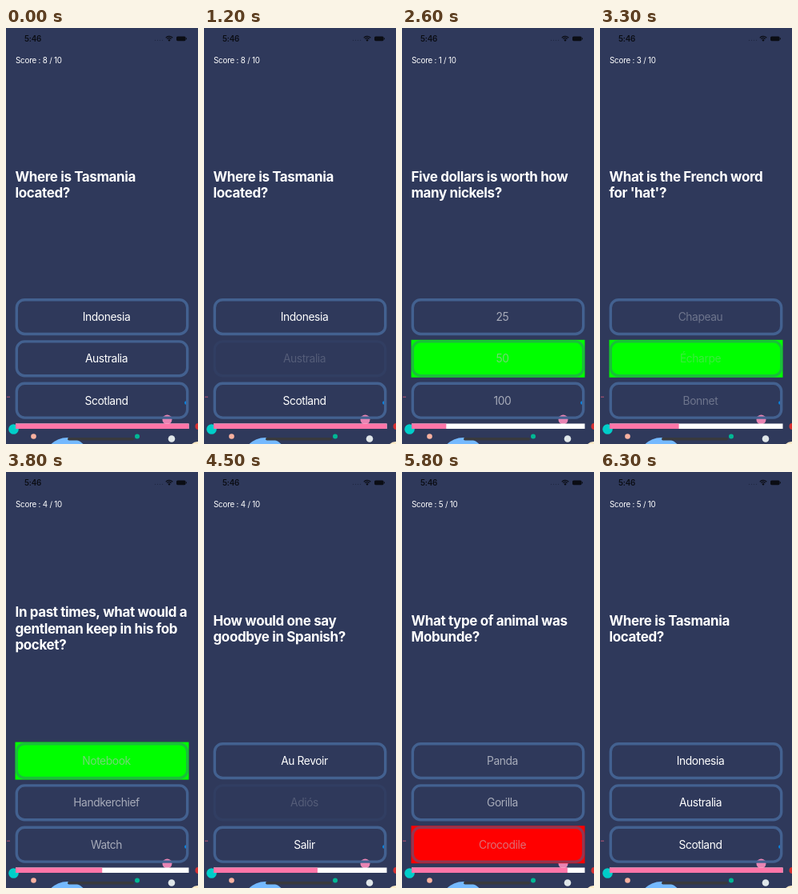
Recreate the animation shown at these times as an HTML page with a canvas. Size 240 by 520 pixels, loop 6.4 s.

```html
<!DOCTYPE html>
<html lang="en">
<head>
<meta charset="utf-8">
<title>Quiz</title>
<style>
html, body { margin: 0; width: 100%; height: 100%; overflow: hidden; background: #2f395b; }
canvas { display: block; width: 240px; height: 520px; }
</style>
</head>
<body>
<canvas id="stage"></canvas>
<script>
const W = 240, H = 520, LOOP = 6400, STEP = 100;
const BG = '#2f395b', EDGE = '#436190';
const GREEN = '#00ff00', RED = '#ff0000';
const SANS = 'Inter, "Liberation Sans", sans-serif';
const TOPS = [338, 390.2, 442.6];

const quiz = [
  { ask: ['Which is the largest organ', 'in the human body?'], answers: ['Heart', 'Skin', 'Large Intestine'], right: 1 },
  { ask: ['Five dollars is worth how', 'many nickels?'], answers: ['25', '50', '100'], right: 2 },
  { ask: ['What do the letters in the', 'GMT time zone stand for?'], answers: ['Global Meridian Time', 'Greenwich Mean Time', 'General Median Time'], right: 1 },
  { ask: ['What is the French word', "for 'hat'?"], answers: ['Chapeau', 'Écharpe', 'Bonnet'], right: 0 },
  { ask: ['In past times, what would a', 'gentleman keep in his fob', 'pocket?'], answers: ['Notebook', 'Handkerchief', 'Watch'], right: 2 },
  { ask: ['How would one say', 'goodbye in Spanish?'], answers: ['Au Revoir', 'Adiós', 'Salir'], right: 1 },
  { ask: ['Which of these colours is', 'NOT featured in the logo', 'for Lumbra?'], answers: ['Green', 'Orange', 'Blue'], right: 1 },
  { ask: ['What alcoholic drink is', 'made from molasses?'], answers: ['Rum', 'Whisky', 'Gin'], right: 0 },
  { ask: ['What type of animal was', 'Mobunde?'], answers: ['Panda', 'Gorilla', 'Crocodile'], right: 1 },
  { ask: ['Where is Tasmania', 'located?'], answers: ['Indonesia', 'Australia', 'Scotland'], right: 1 }
];

// Each turn: question, score shown, time of the tap, tapped answer.
// The next question follows 200 ms after the tap.
const turns = [
  [9, 8, 1200, 1], [0, 0, 2300, 1], [1, 1, 2700, 2], [2, 2, 3100, 1],
  [3, 3, 3500, 0], [4, 4, 3900, 0], [5, 4, 4500, 1], [6, 5, 5000, 0],
  [7, 5, 5500, 2], [8, 5, 5900, 0], [9, 5, 9900, 1]
].map(([q, score, tap, pick]) => ({ q, score, tap, pick, fill: quiz[q].right === pick ? GREEN : RED }));
turns.forEach((turn, i) => { turn.start = i ? turns[i - 1].tap + 200 : -1000; });

const canvas = document.getElementById('stage');
const ctx = canvas.getContext('2d');
const ratio = window.devicePixelRatio || 1;
canvas.width = W * ratio;
canvas.height = H * ratio;

function rect(x, y, w, h, color) {
  ctx.fillStyle = color;
  ctx.fillRect(x, y, w, h);
}

function disc(x, y, r, color) {
  ctx.fillStyle = color;
  ctx.beginPath();
  ctx.arc(x, y, r, 0, Math.PI * 2);
  ctx.fill();
}

function pill(x, y, w, h, r, color) {
  ctx.fillStyle = color;
  ctx.beginPath();
  ctx.roundRect(x, y, w, h, r);
  ctx.fill();
}

function label(str, x, y, size, weight, spacing, color = '#fff', align = 'left') {
  ctx.font = `${weight} ${size}px ${SANS}`;
  ctx.letterSpacing = spacing + 'px';
  ctx.textAlign = align;
  ctx.fillStyle = color;
  ctx.fillText(str, x, y);
}

function bubbles() {
  disc(9.5, 501.5, 6.3, '#00cec9');
  disc(201.5, 489.5, 6, '#e884b3');
  disc(34.5, 510.5, 3.3, '#fab1a0');
  disc(76.5, 541, 29, '#74b9ff');
  disc(164, 510.5, 3, '#00b894');
  disc(207, 513.5, 4.3, '#dfe6e9');
  disc(239.5, 527.5, 10.5, '#fdebc8');
  disc(240.5, 498, 4, '#d63031');
  disc(225.3, 468.5, 2.2, '#0984e3');
  rect(1, 460.6, 4, 1.2, '#a2506f');
}

function statusBar() {
  const ink = '#0b0d14';
  label('5:46', 23, 17, 9.8, 600, -0.2, ink);
  for (let i = 0; i < 4; i++) disc(186.5 + i * 3, 15.3, 0.6, '#1f2640');
  ctx.strokeStyle = ink;
  ctx.lineWidth = 1.2;
  for (const r of [3.4, 5.6]) {
    ctx.beginPath();
    ctx.arc(204, 16, r, -Math.PI * 0.77, -Math.PI * 0.23);
    ctx.stroke();
  }
  disc(204, 15.2, 1.2, ink);
  pill(213, 10.4, 11.6, 5.8, 1.6, ink);
  pill(225.1, 12.2, 0.9, 2.2, 0.4, ink);
}

function button(i, text, alpha, fill, pressed) {
  const y = TOPS[i];
  if (fill) rect(11.5, y - 0.4, 217, 47, fill);
  ctx.globalAlpha = pressed ? 0.13 : fill === RED ? 0.55 : fill ? 0.4 : 1;
  ctx.strokeStyle = EDGE;
  ctx.lineWidth = 3.4;
  ctx.beginPath();
  ctx.roundRect(13.3, y + 1.7, 213.4, 42.8, 10);
  ctx.stroke();
  ctx.globalAlpha = pressed ? 0.18 : alpha;
  const color = fill && alpha < 1 ? '#c4bcc8' : '#fff';
  label(text, 125.5, y + 28, 13.8, 400, -0.4, color, 'center');
  ctx.globalAlpha = 1;
}

function progress(t, q) {
  if (t >= 1300 && t < 2300) {
    const left = Math.max(0, 1 - (t - 1300) / 800);
    return 0.1 + 0.9 * left ** 1.245;
  }
  return (q + 1) / 10;
}

function draw(t) {
  const n = turns.findLastIndex(turn => t >= turn.start);
  const now = turns[n], last = turns[n - 1];
  const { ask, answers } = quiz[now.q];
  const age = t - now.start;
  const alpha = age < 100 ? 0.3 : age < 200 ? 0.58 : 1;

  ctx.setTransform(ratio, 0, 0, ratio, 0, 0);
  rect(0, 0, W, H, BG);
  bubbles();
  statusBar();
  label(`Score : ${now.score} / 10`, 12, 43.5, 9.8, 400, -0.2);
  ask.forEach((line, i) => {
    label(line, 11.5, 201.9 + (i - (ask.length - 1) / 2) * 20.5, 17, 700, -0.39);
  });

  answers.forEach((text, i) => {
    let fill = null;
    if (t >= now.tap + 100 && i === now.pick) fill = now.fill;
    if (alpha < 1 && last && i === last.pick) fill = last.fill;
    const pressed = i === now.pick && t >= now.tap && t < now.tap + 100;
    button(i, text, alpha, fill, pressed);
  });

  rect(12, 494.5, 216.5, 6.5, '#fff');
  rect(12, 494.5, 216.5 * progress(t, now.q), 6.5, '#ff75a8');
  pill(77, 512, 83, 3.4, 1.7, '#38393d');
}

const begin = performance.now();
function tick() {
  const t = (performance.now() - begin) % LOOP;
  draw(Math.floor(t / STEP) * STEP);
  requestAnimationFrame(tick);
}
tick();
</script>
</body>
</html>
```
